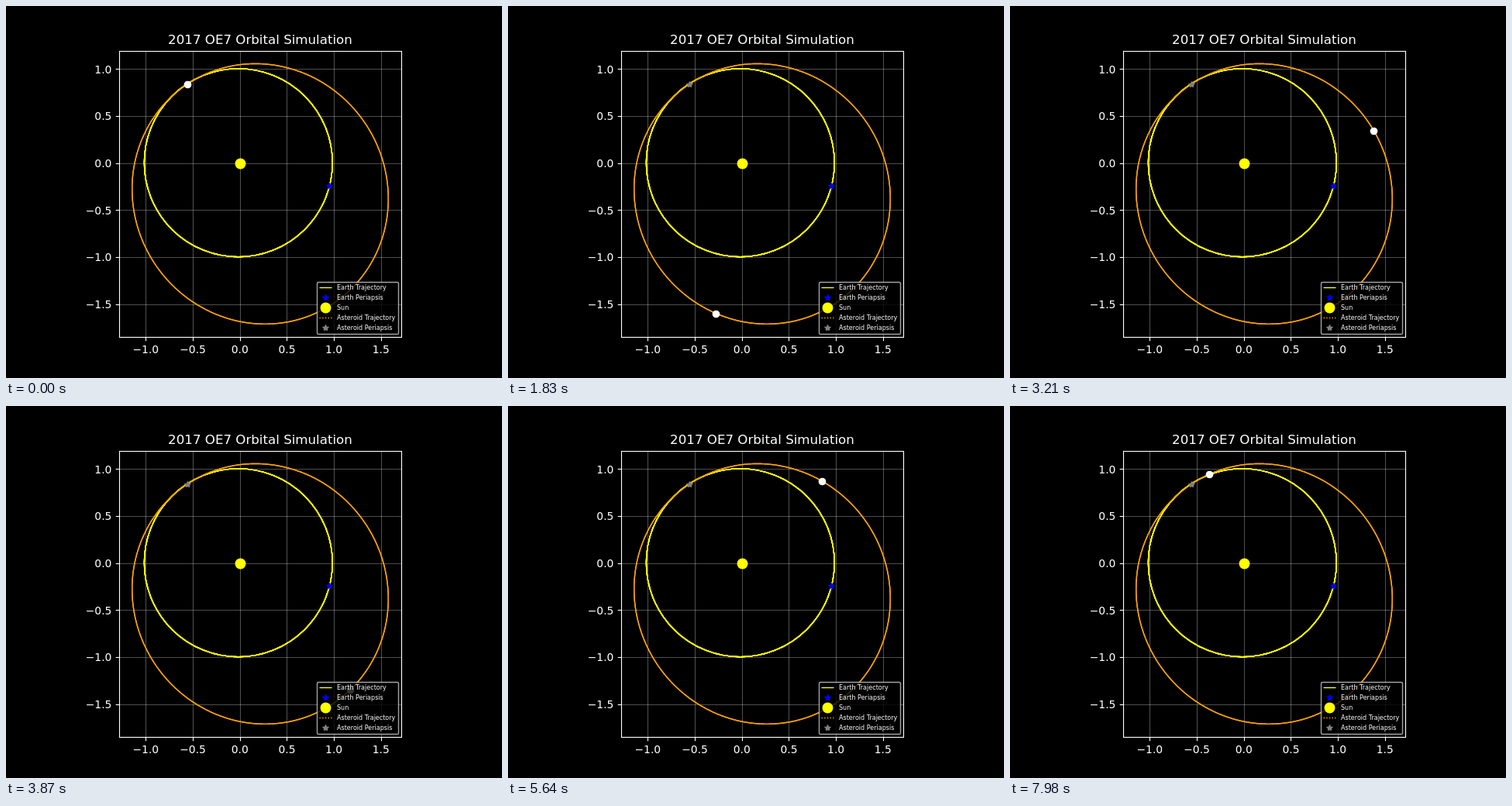
An HTML page that plays this animation: 640 px wide and 480 px high, repeating every 8000 ms.

```html
<!DOCTYPE html>
<html lang="en">
<head>
<meta charset="utf-8">
<title>Orbital Simulation</title>
<style>
  html, body { margin: 0; width: 100%; height: 100%; overflow: hidden; background: #000; }
  svg { display: block; width: 640px; height: 480px; }
  text { font-family: "DejaVu Sans", sans-serif; font-size: 13.89px; fill: #fff; }
  .title { font-size: 16.67px; }
  .legend text { font-size: 8.04px; }
  .middle { text-anchor: middle; }
  .end { text-anchor: end; }
  .line { fill: none; stroke-width: 1.39; }
</style>
</head>
<body>
<svg viewBox="0 0 640 480">
  <defs>
    <path id="star" stroke-width="1.39" stroke-linejoin="bevel"/>
  </defs>
  <rect width="640" height="480"/>
  <g id="grid" stroke="#fff" stroke-opacity=".3" stroke-width="1.11"/>
  <g id="ticks" stroke="#fff" stroke-width="1.11"/>
  <g id="labels"></g>

  <g id="earthOrbit" class="line" stroke="#ff0"></g>
  <use href="#star" x="417.5" y="232.5" fill="#00f" stroke="#00f"/>
  <circle cx="302.5" cy="203.5" r="6.95" fill="#ff0"/>
  <g id="asteroidOrbit" class="line" stroke="#ffa500"></g>
  <use href="#star" x="234.5" y="101.5" fill="#808080" stroke="#808080"/>
  <circle id="asteroid" r="4.86" fill="#fff"/>

  <rect x="146.5" y="58.5" width="364" height="369" fill="none" stroke="#fff" stroke-width="1.11"/>
  <text class="title middle" x="328" y="49">2017 OE7 Orbital Simulation</text>

  <g class="legend">
    <rect x="401.5" y="356.5" width="105" height="67" rx="1.6" fill="#000" fill-opacity=".8"
          stroke="#ccc" stroke-opacity=".8" stroke-width="1.39"/>
    <path class="line" d="M404.5 363.5H420.5" stroke="#ff0"/>
    <use href="#star" x="412.5" y="376.5" fill="#00f" stroke="#00f"/>
    <circle cx="412.5" cy="389.5" r="6.95" fill="#ff0"/>
    <path class="line" d="M404.5 402.5H420.5" stroke="#ffa500" stroke-dasharray="1.39 2.29"/>
    <use href="#star" x="412.5" y="415.5" fill="#808080" stroke="#808080"/>
    <text x="427" y="366">Earth Trajectory</text>
    <text x="427" y="379">Earth Periapsis</text>
    <text x="427" y="392">Sun</text>
    <text x="427" y="405">Asteroid Trajectory</text>
    <text x="427" y="418">Asteroid Periapsis</text>
  </g>
</svg>
<script>
const $ = id => document.getElementById(id);
const snap = v => Math.floor(v + 0.5) + 0.5;

function add(parent, name, attrs, text = "") {
  const el = document.createElementNS("http://www.w3.org/2000/svg", name);
  for (const key in attrs) el.setAttribute(key, attrs[key]);
  el.textContent = text;
  parent.append(el);
}

// Axes
const sun = { x: 301.75, y: 202.75 }, unit = 121.4;
const label = v => v.toFixed(1).replace("-", "\u2212");

for (let v = -1; v <= 1.5; v += 0.5) {
  const x = sun.x + v * unit;
  add($("grid"), "path", { d: `M${snap(x)} 58V427` });
  add($("ticks"), "path", { d: `M${snap(x)} 427.5v4.86` });
  add($("labels"), "text", { class: "middle", x, y: 448 }, label(v));
}
for (let v = -1.5; v <= 1; v += 0.5) {
  const y = sun.y - v * unit;
  add($("grid"), "path", { d: `M146 ${snap(y)}H510` });
  add($("ticks"), "path", { d: `M146.5 ${snap(y)}h-4.86` });
  add($("labels"), "text", { class: "end", x: 136.4, y: Math.round(y + 5.2) }, label(v));
}

// Five-pointed marker on whole pixels
const points = Array.from({ length: 10 }, (_, i) => {
  const r = i % 2 ? 1.59 : 4.17, angle = i * Math.PI / 5;
  return `${Math.round(r * Math.sin(angle))} ${Math.round(-r * Math.cos(angle))}`;
});
$("star").setAttribute("d", `M${points.join("L")}Z`);

// Asteroid orbit; (ux, uy) points from its centre to periapsis
const orbit = { x: 328, y: 242.4, a: 170, b: 163.2, e: 0.284, ux: -0.5527, uy: -0.8333 };
const tilt = Math.atan2(orbit.uy, orbit.ux) * 180 / Math.PI;

// Each trajectory is traced several times over, which hardens its edges
for (let lap = 0; lap < 6; lap++) {
  add($("earthOrbit"), "circle", { cx: 299.8, cy: 202.3, r: unit });
  add($("asteroidOrbit"), "ellipse", {
    rx: orbit.a, ry: orbit.b,
    transform: `translate(${orbit.x} ${orbit.y}) rotate(${tilt})`,
    "stroke-dasharray": "1.39 2.29", "stroke-dashoffset": lap * 0.61
  });
}

const LOOP = 8000, STEP = 30, PERIOD = 88.12;

function position(step) {
  const mean = step / PERIOD * 2 * Math.PI;
  let E = mean;
  for (let i = 0; i < 20; i++) E = mean + orbit.e * Math.sin(E);
  const p = orbit.a * Math.cos(E), q = orbit.b * Math.sin(E);
  return [orbit.x + p * orbit.ux - q * orbit.uy, orbit.y + p * orbit.uy + q * orbit.ux];
}

function draw() {
  const step = Math.floor(performance.now() % LOOP / STEP);
  const [x, y] = position(step).map(snap);
  $("asteroid").setAttribute("cx", x);
  $("asteroid").setAttribute("cy", y);
  requestAnimationFrame(draw);
}
draw();
</script>
</body>
</html>
```
